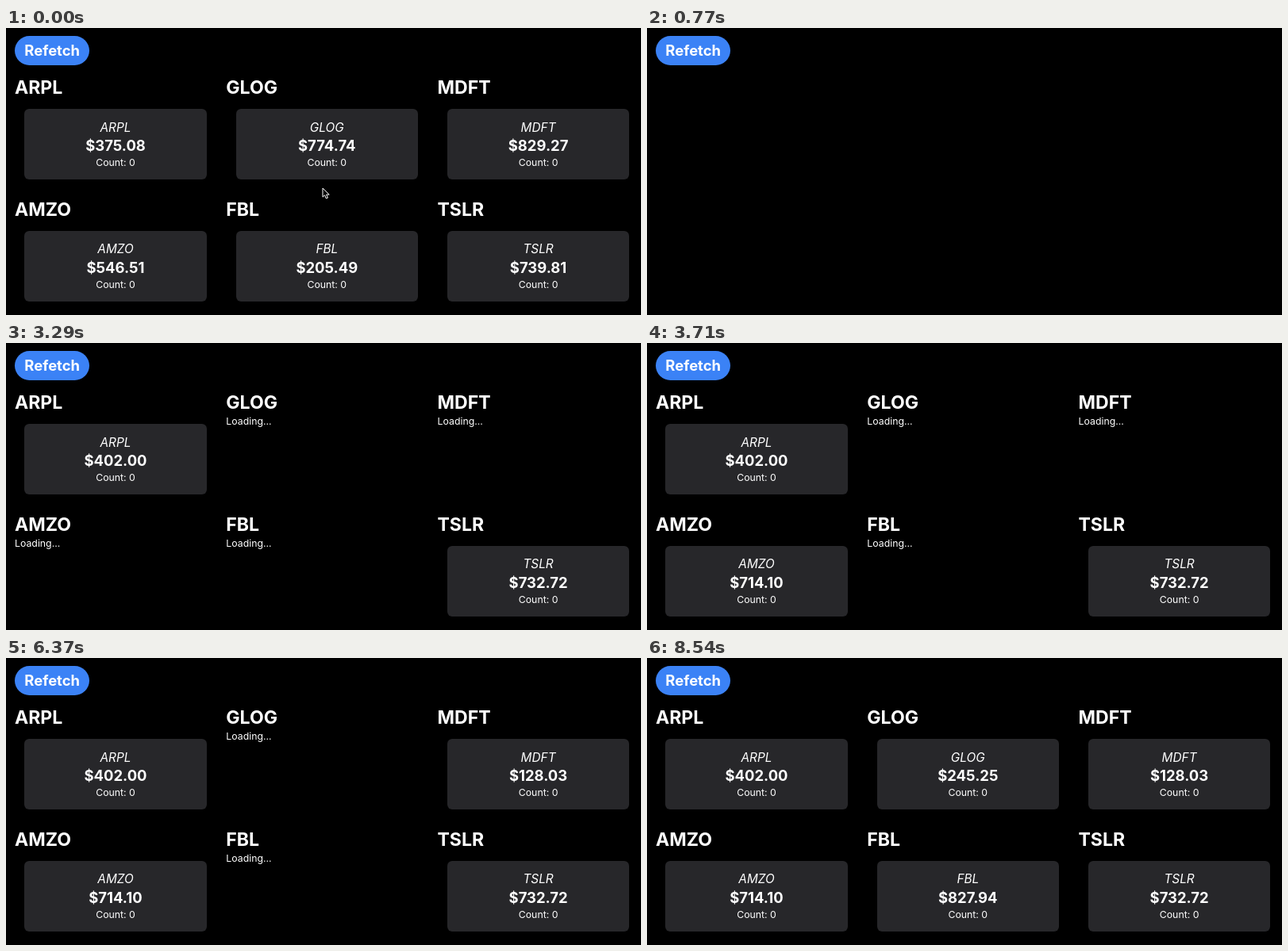
Recreate the animation shown at these times as an HTML page. Size 800 by 362 pixels, loop 8.61 s.

```html
<!DOCTYPE html>
<html lang="en">
<head>
<meta charset="utf-8">
<title>Stock prices</title>
<style>
  * { box-sizing: border-box; margin: 0; padding: 0; }
  html { font-size: 12.3077px; }
  html, body { width: 100%; height: 100%; overflow: hidden; background: #000; }
  body {
    position: relative;
    color: #fff;
    font: 1rem/1.5rem Inter, sans-serif;
    font-optical-sizing: none;
  }
  [hidden] { display: none !important; }
  .refetch {
    position: absolute; left: 11px; top: 10.3px;
    padding: .5rem 1rem;
    border-radius: 99rem;
    background: #3b82f6;
    font-size: 1.5rem; line-height: 2rem; font-weight: 700;
  }
  .grid {
    position: absolute; left: 11px; top: 62.3px; width: 786.6px;
    display: grid; grid-template-columns: repeat(3, 1fr);
    gap: 1rem; align-items: start;
  }
  h2 { font-size: 1.875rem; line-height: 2.25rem; font-weight: 700; }
  .card {
    margin: 1rem; padding: 1rem;
    border-radius: .5rem;
    background: #27272a;
    text-align: center;
  }
  .name { font-size: 1.25rem; line-height: 1.75rem; font-style: italic; }
  .price { font-size: 1.5rem; line-height: 2rem; font-weight: 700; }
  .cursor { position: absolute; left: 398px; top: 201px; }
</style>
</head>
<body>
<div class="refetch">Refetch</div>
<div class="grid"></div>
<svg class="cursor" width="12" height="17" viewBox="0 0 12 17">
  <path d="M1 1V12.2L3.6 9.8L5.3 14L7.4 13.1L5.7 9.1H9.2Z" fill="#000" stroke="#fff" stroke-width="1"/>
</svg>
<script>
  const LOOP = 8610, CURSOR_GONE = 140, CLEARED = 770, LOADING = 1540;

  // symbol, price before the refetch, price after it, time the new price arrives
  const stocks = [
    ['ARPL', '375.08', '402.00', 2520],
    ['GLOG', '774.74', '245.25', 7770],
    ['MDFT', '829.27', '128.03', 4620],
    ['AMZO', '546.51', '714.10', 3570],
    ['FBL', '205.49', '827.94', 6720],
    ['TSLR', '739.81', '732.72', 3080],
  ];

  const grid = document.querySelector('.grid');
  const cursor = document.querySelector('.cursor');

  const cells = stocks.map(([symbol, before, after, arrival]) => {
    const cell = document.createElement('section');
    cell.innerHTML = `
      <h2>${symbol}</h2>
      <p class="loading">Loading...</p>
      <div class="card">
        <p class="name">${symbol}</p>
        <p class="price"></p>
        <p>Count: 0</p>
      </div>`;
    grid.append(cell);
    const find = name => cell.querySelector(name);
    return { before, after, arrival, loading: find('.loading'), card: find('.card'), price: find('.price') };
  });

  function render(t) {
    cursor.toggleAttribute('hidden', t >= CURSOR_GONE);
    grid.hidden = t >= CLEARED && t < LOADING;
    for (const { before, after, arrival, loading, card, price } of cells) {
      const ready = t < CLEARED || t >= arrival;
      loading.hidden = ready;
      card.hidden = !ready;
      const text = '$' + (t < CLEARED ? before : after);
      if (price.textContent !== text) price.textContent = text;
    }
  }

  const start = performance.now();
  function tick() {
    render((performance.now() - start) % LOOP);
    requestAnimationFrame(tick);
  }
  tick();
</script>
</body>
</html>
```
